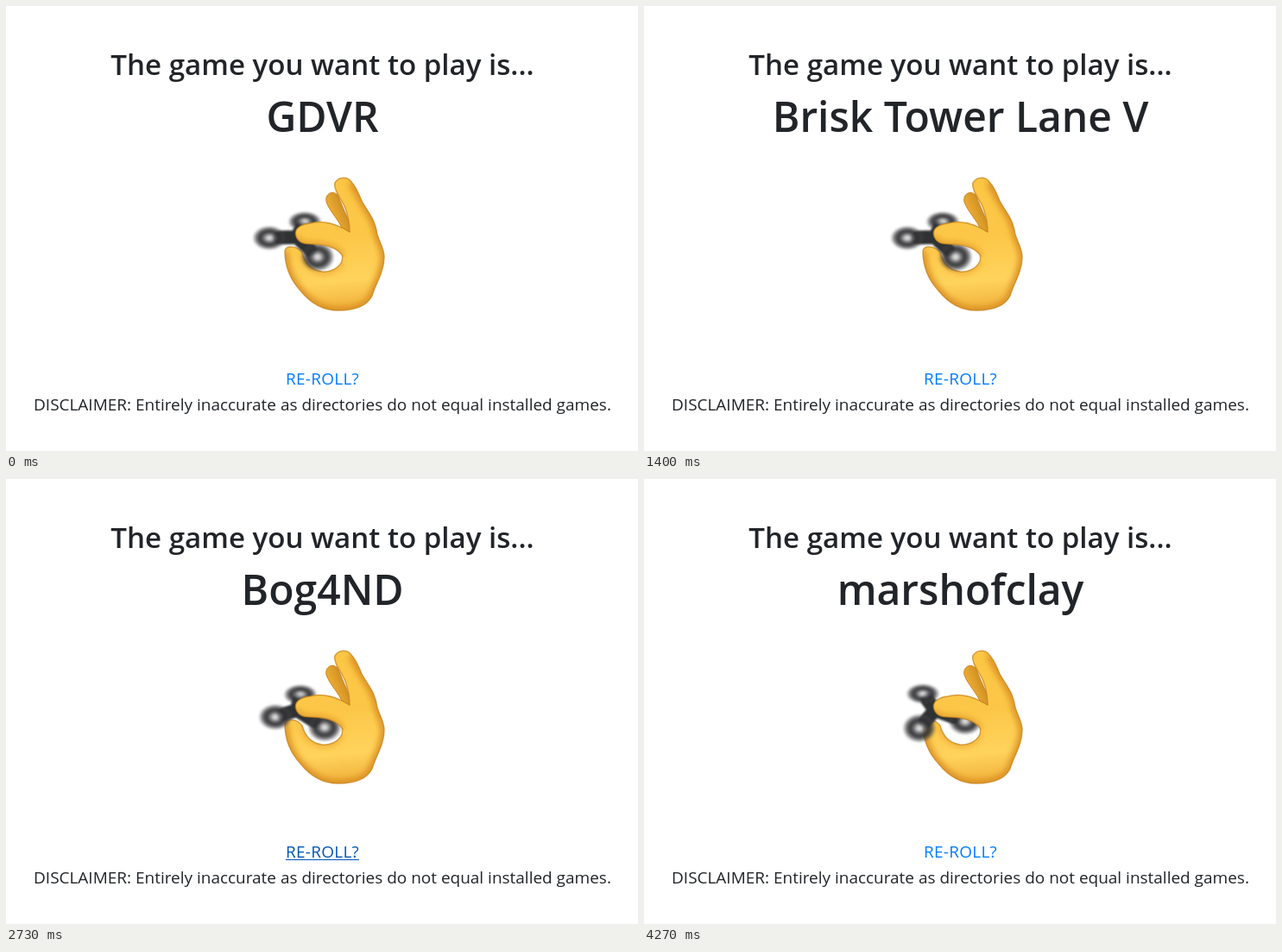
These frames come from a looping animation (732x516 px, 4.34 s). An HTML page:

```html
<!DOCTYPE html>
<html lang="en">
<head>
<meta charset="utf-8">
<title>Game picker</title>
<style>
  html, body { margin: 0; width: 100%; height: 100%; overflow: hidden; background: #fff; }
  svg { display: block; width: 732px; height: 516px; }
  text { font-family: "Open Sans", "Noto Sans", sans-serif; text-anchor: middle; fill: #212529; }
  #head { font-size: 33.1px; font-weight: 600; }
  #title { font-size: 48px; font-weight: 600; }
  .small { font-size: 18.98px; }
  #link { fill: #007bff; letter-spacing: .3px; }
  .hover #link { fill: #0056b3; }
  #line { fill: #0056b3; visibility: hidden; }
  .hover #line { visibility: inherit; }
  .edge { fill: none; stroke: #c8841c; stroke-width: 1.5; stroke-linecap: round; }
</style>
</head>
<body>
<svg viewBox="0 0 732 516">
  <defs>
    <linearGradient id="skin" gradientUnits="userSpaceOnUse" x1="372" y1="200" x2="386" y2="353">
      <stop offset="0" stop-color="#fcc645"/>
      <stop offset=".45" stop-color="#fcc748"/>
      <stop offset=".78" stop-color="#ffd35c"/>
      <stop offset="1" stop-color="#f0b03a"/>
    </linearGradient>
    <linearGradient id="ring" gradientUnits="userSpaceOnUse" x1="371" y1="230" x2="390" y2="222">
      <stop offset="0" stop-color="#efae35"/>
      <stop offset="1" stop-color="#c98a1f"/>
    </linearGradient>
    <radialGradient id="weight">
      <stop offset="0" stop-color="#e6e6e6" stop-opacity=".9"/>
      <stop offset=".14" stop-color="#c0c0c0" stop-opacity=".85"/>
      <stop offset=".34" stop-color="#58585a" stop-opacity=".9"/>
      <stop offset=".54" stop-color="#2c2d2f" stop-opacity=".95"/>
      <stop offset=".74" stop-color="#3a3a3c" stop-opacity=".7"/>
      <stop offset="1" stop-color="#555" stop-opacity="0"/>
    </radialGradient>
    <filter id="soft" x="-20%" y="-20%" width="140%" height="140%"><feGaussianBlur stdDeviation="3.5"/></filter>
    <filter id="haze" x="-20%" y="-20%" width="140%" height="140%"><feGaussianBlur stdDeviation=".8"/></filter>
    <path id="palm" d="M323 284C323 303 330 318 341 330C353 345 368 353 385 353C403 353 418 348 424 336
      C428 322 438 308 438 291C438 280 430 270 429 260C426 246 420 240 412 226C408 216 404 208 400 204
      C396 198 386 197 381 205C379 212 387 222 392 232C396 242 398 252 398 262L380 272
      C388 280 391 290 389 296C385 305 375 309 366 308C352 306 346 297 343 286C338 279 325 276 323 284Z"/>
    <path id="finger" d="M336 267C333 258 342 253 352 252C366 248 380 251 392 259C404 266 416 268 424 272
      L428 290C412 296 398 297 390 290C386 283 376 278 366 277C354 275 340 279 336 267Z"/>
    <clipPath id="palmClip"><use href="#palm"/></clipPath>
    <clipPath id="fingerClip"><use href="#finger"/></clipPath>
  </defs>

  <text id="head" x="366.5" y="79.5">The game you want to play is...</text>

  <g id="rest">
    <text id="title" x="366.5" y="146"></text>

    <path d="M371 227C369 218 378 213 384 219L404 266L390 260C386 248 375 239 371 227Z" fill="url(#ring)" stroke="#c8841c"/>
    <use href="#palm" fill="url(#skin)"/>
    <g clip-path="url(#palmClip)" fill="none" filter="url(#soft)">
      <path d="M323 284C323 303 330 318 341 330C353 345 368 353 385 353C403 353 418 348 424 336C428 322 438 308 438 291C438 280 430 270 429 260C426 246 420 240 412 226L400 204" stroke="#d98e20" stroke-width="8"/>
      <path d="M343 286C346 297 352 306 366 308C375 309 385 305 389 296" stroke="#eda832" stroke-width="5"/>
    </g>
    <use href="#palm" class="edge" opacity=".75"/>

    <g id="spinner" filter="url(#haze)">
      <path id="arms" fill="none" stroke="#2e3033" stroke-width="16" stroke-linecap="round" stroke-linejoin="round"/>
      <g id="lobes"></g>
    </g>

    <use href="#finger" fill="url(#skin)"/>
    <g clip-path="url(#fingerClip)">
      <path d="M336 267C340 279 354 275 366 277C376 278 386 283 390 290" fill="none" stroke="#e09725" stroke-width="5" filter="url(#soft)"/>
    </g>
    <path class="edge" opacity=".7" d="M398 262C380 251 366 248 352 252C342 253 333 258 336 267C340 279 354 275 366 277C376 278 386 283 390 290"/>

    <g id="reroll">
      <text id="link" class="small" x="366.5" y="439">RE-ROLL?</text>
      <rect id="line" x="324" y="441" width="85" height="1"/>
    </g>
    <text class="small" x="366.5" y="469">DISCLAIMER: Entirely inaccurate as directories do not equal installed games.</text>
  </g>
</svg>
<script>
const LOOP = 4340, STEP = 200 / 3, LAST = 64;
const $ = id => document.getElementById(id);

const titles = ["GDVR", "Brisk Tower Lane V", "Bog4ND", "marshofclay"];
const reloads = [19, 32, 47];   // page is redrawn on these steps
const hovers = [5, 24, 37];     // pointer reaches the link

// Closed orbit of a weight, clockwise from the left
const angles = [-18, 0, 20, 35, 65];
const places = [
  [312, 276], [305, 269], [311, 259], [314, 254], [323, 249],
  [341, 250], [346, 250], [358, 256], [361, 261], [372, 281],
  [369, 288], [361, 291], [346, 295], [336, 293], [319, 289]
];
const orbit = places.map(([x, y], i) => [angles[i % 5] + 120 * Math.floor(i / 5), x, y]);
orbit.push([342, ...places[0]]);

// [step, degrees turned]
const spin = [[0, 0], [9, 260], [17, 507], [18, 507], [21, 600], [29, 822], [41, 1182], [51, 1475], [64, 1865]];

function along(keys, at) {
  let i = 1;
  while (i < keys.length - 1 && keys[i][0] < at) i++;
  const a = keys[i - 1], b = keys[i], k = (at - a[0]) / (b[0] - a[0]);
  return a.slice(1).map((v, j) => v + (b[j + 1] - v) * k);
}

function set(e, attrs) {
  for (const name in attrs) e.setAttribute(name, attrs[name]);
}

const lobes = [0, 1, 2].map(() => {
  const e = document.createElementNS("http://www.w3.org/2000/svg", "ellipse");
  set(e, { rx: 20, fill: "url(#weight)" });
  $("lobes").append(e);
  return e;
});

function stepAt(t) {
  const n = Math.floor((t + 5) / STEP);
  const start = 10 * Math.round(n * STEP / 10);
  return Math.min(LAST, start > t ? n - 1 : n);
}

function turn(step) {
  const [angle] = along(spin, step);
  let arms = "";
  lobes.forEach((e, i) => {
    const [cx, cy] = along(orbit, (angle + 120 * i + 18) % 360 - 18);
    // far weights look flatter
    set(e, { cx, cy, ry: 12 + (cy - 249) * .13 });
    arms += `M337 268L${337 + (cx - 337) * .62} ${268 + (cy - 268) * .62}`;
  });
  set($("arms"), { d: arms });
}

let shown = -1;
function draw(step) {
  if (step === shown) return;
  shown = step;
  const page = reloads.filter(r => step >= r).length;
  const blank = reloads.indexOf(step);
  $("rest").style.visibility = blank >= 0 ? "hidden" : "visible";
  $("head").style.visibility = blank > 0 ? "hidden" : "visible";
  $("title").textContent = titles[page];
  $("reroll").setAttribute("class", step >= hovers[page] ? "hover" : "");
  turn(step);
}

function tick() {
  draw(stepAt(performance.now() % LOOP));
  requestAnimationFrame(tick);
}
tick();
</script>
</body>
</html>
```
